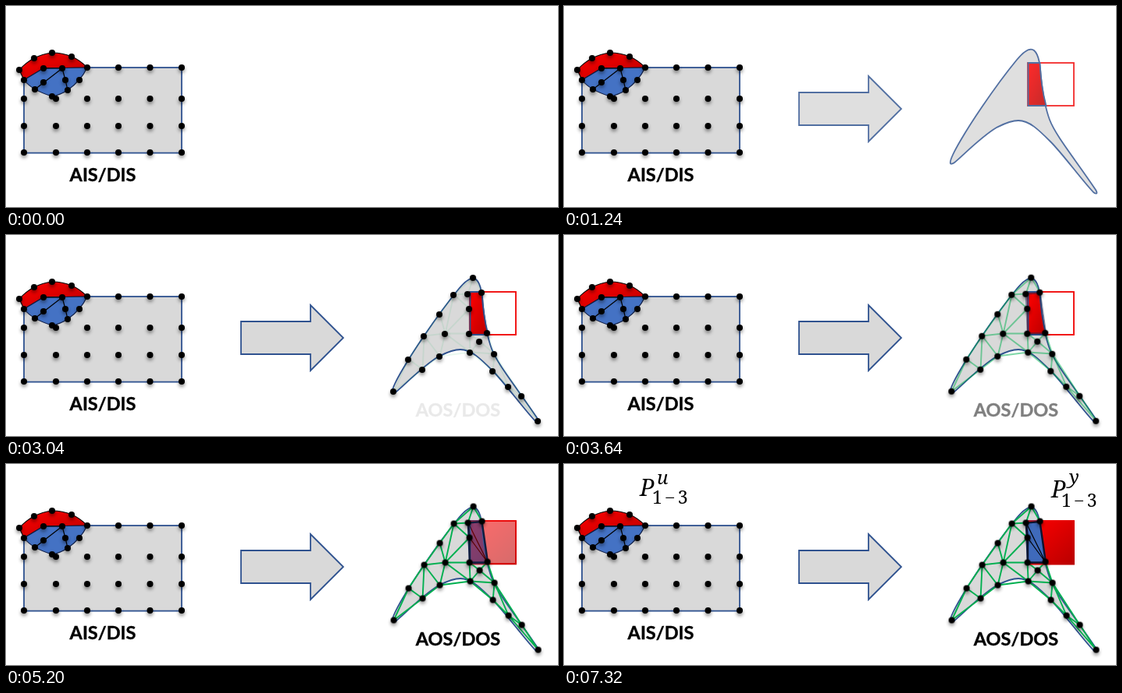
An HTML page for the animation above (7.36 s loop, 707 px wide and 258 px high).

```html
<!DOCTYPE html>
<html lang="en">
<head>
<meta charset="utf-8">
<title>Input and output sets</title>
<style>
  html, body { margin: 0; width: 100%; height: 100%; overflow: hidden; background: #fff; }
  svg { display: block; width: 707px; height: 258px; }
  .body { fill: #d9d9d9; stroke: #2f528f; stroke-width: 1.8; }
  .ink { fill: none; stroke: #000; stroke-width: 1.2; stroke-linejoin: round; }
  .mesh { fill: none; stroke: #00b050; stroke-width: 1.9; stroke-linecap: round; }
  .dots { filter: drop-shadow(0 3px 2px rgba(0, 0, 0, .42)); }
  .name { font: bold 23.5px Lato, Carlito, sans-serif; text-anchor: middle; stroke: #000; stroke-width: .4; }
  .math { font: italic 30px "Noto Serif", "Liberation Serif", serif; }
  .sup { font-size: 24px; }
  .sub { font-size: 23px; font-style: normal; letter-spacing: 3.5px; }

  /* Five linear fades, one after the other */
  .fade { animation: 7360ms linear infinite both; }
  .s1 { animation-name: shape; }
  .s2 { animation-name: points; }
  .s3 { animation-name: mesh; }
  .s4 { animation-name: overlap; }
  .s5 { animation-name: labels; }
  .nudge { animation: nudge 7360ms linear infinite both; }
  @keyframes shape   { 0%, .543% { opacity: 0 } 20.109%, 100% { opacity: 1 } }
  @keyframes points  { 0%, 20.109% { opacity: 0 } 39.674%, 100% { opacity: 1 } }
  @keyframes mesh    { 0%, 39.674% { opacity: 0 } 59.239%, 100% { opacity: 1 } }
  @keyframes overlap { 0%, 59.511% { opacity: 0 } 78.804%, 100% { opacity: 1 } }
  @keyframes labels  { 0%, 79.62% { opacity: 0 } 99.185%, 100% { opacity: 1 } }
  @keyframes nudge {
    0%, 39.674% { transform: translate(0, 0) }
    59.239%, 100% { transform: translate(.6px, -.5px) }
  }
</style>
</head>
<body>
<svg viewBox="0 0 707 258">
  <defs>
    <linearGradient id="red" x1="0" y1="0" x2="1" y2="1">
      <stop offset=".1" stop-color="#f80000"/>
      <stop offset="1" stop-color="#b80000"/>
    </linearGradient>
  </defs>

  <!-- Input set -->
  <rect class="body" x="23" y="79" width="202" height="109.6"/>
  <path class="ink" style="fill:url(#red)" d="M17 82Q34 63 59 60Q86 60 104 79L48 80L23 95Z"/>
  <path class="ink" style="fill:#4472c4;stroke:#10204a" d="M23 95L48 80L104 79Q96 96 79 108Q70 114 59 116Q33 108 23 95Z"/>
  <path class="ink" d="M48 80H72L37 107M72 80L76 95L79 108"/>
  <g class="dots" id="inDots"></g>
  <text class="name" x="124" y="225">AIS/DIS</text>

  <!-- Arrow and output set -->
  <g class="fade s1">
    <path class="body" d="M301 111H390V90L432 132L390 174V153H301Z"/>
    <path class="body" d="M495 202C492 196 520 152 535 130C552 105 566 86 580 69C590 57 597 53 602 57
      C609 63 610 79 611 92C613 110 616 130 622 146C630 167 655 197 681 236C684 241 682 242 678 239
      C662 222 639 190 623 174C608 159 596 147 582 147C571 147 562 152 554 156C534 168 512 191 500 201
      C497 203 495 203 495 202Z"/>
    <rect x="594" y="73" width="59" height="55" fill="none" stroke="#f00000" stroke-width="1.8"/>
    <path d="M594.5 73H609.5Q611 104 617.5 128H594.5Z" fill="url(#red)" stroke="#2f528f" stroke-width="1.8"/>
  </g>

  <g class="fade s3">
    <path class="mesh" id="edges"/>
    <path d="M592 75.5L609.5 74L617 126.5H594Z" fill="none" stroke="#1b2a55" stroke-width="2.6"/>
  </g>

  <g class="fade s4">
    <rect x="594" y="72.5" width="60" height="57" fill="url(#red)"/>
    <path d="M592 75.5L609.5 74L617 126.5H594V95Z" fill="#3f6abb" stroke="#0c1530" stroke-width="2.4"/>
    <path class="ink" stroke-width="1.5" d="M592 75.5L617 126.5L594 95"/>
  </g>

  <g class="fade s2"><g class="dots nudge" id="outDots"></g></g>
  <text class="name fade s3" x="579" y="233">AOS/DOS</text>

  <g class="math fade s5">
    <text x="97" y="41">P</text>
    <text class="sup" x="119" y="26">u</text>
    <text class="sub" x="113" y="51">1−3</text>
    <text x="624" y="43">P</text>
    <text class="sup" x="647" y="25">y</text>
    <text class="sub" x="637" y="55">1−3</text>
  </g>
</svg>
<script>
  const byId = id => document.getElementById(id);

  function addDots(id, points) {
    byId(id).innerHTML = points.map(([x, y]) => `<circle cx="${x}" cy="${y}" r="4"/>`).join("");
  }

  const grid = [];
  for (const y of [79, 119, 154, 188])
    for (const x of [23, 64, 104, 144, 184.5, 225])
      if (y > 79 || x > 64) grid.push([x, y]);

  const cap = [[17, 82], [36, 67], [59, 60], [84, 65], [23, 95], [48, 80], [72, 80],
    [94, 95], [79, 108], [59, 116], [37, 107], [48, 98], [76, 95]];
  addDots("inDots", grid.concat(cap));

  const nodes = {
    a: [496, 201], b: [515, 160], c: [535, 130], d: [555, 102], e: [573, 77], f: [591, 76],
    g: [598, 55], h: [609, 74], i: [593, 95], j: [562, 127], k: [593, 127], l: [616, 126],
    m: [606, 137], n: [555, 156], o: [533, 173], p: [594, 151], q: [625, 153], r: [623, 175],
    s: [643, 195], t: [660, 207], u: [681, 239]
  };
  addDots("outDots", Object.values(nodes));

  // Each word is a chain of joined nodes
  const chains = "abcdefgh eg aonp boc cnj cjdj ejp ei ijk pmql lmk kp pq prq rsq qtu sts su";
  byId("edges").setAttribute("d", chains.split(" ").map(chain =>
    "M" + [...chain].map(k => [nodes[k][0] + .6, nodes[k][1] - .5]).join("L")).join(""));
</script>
</body>
</html>
```
